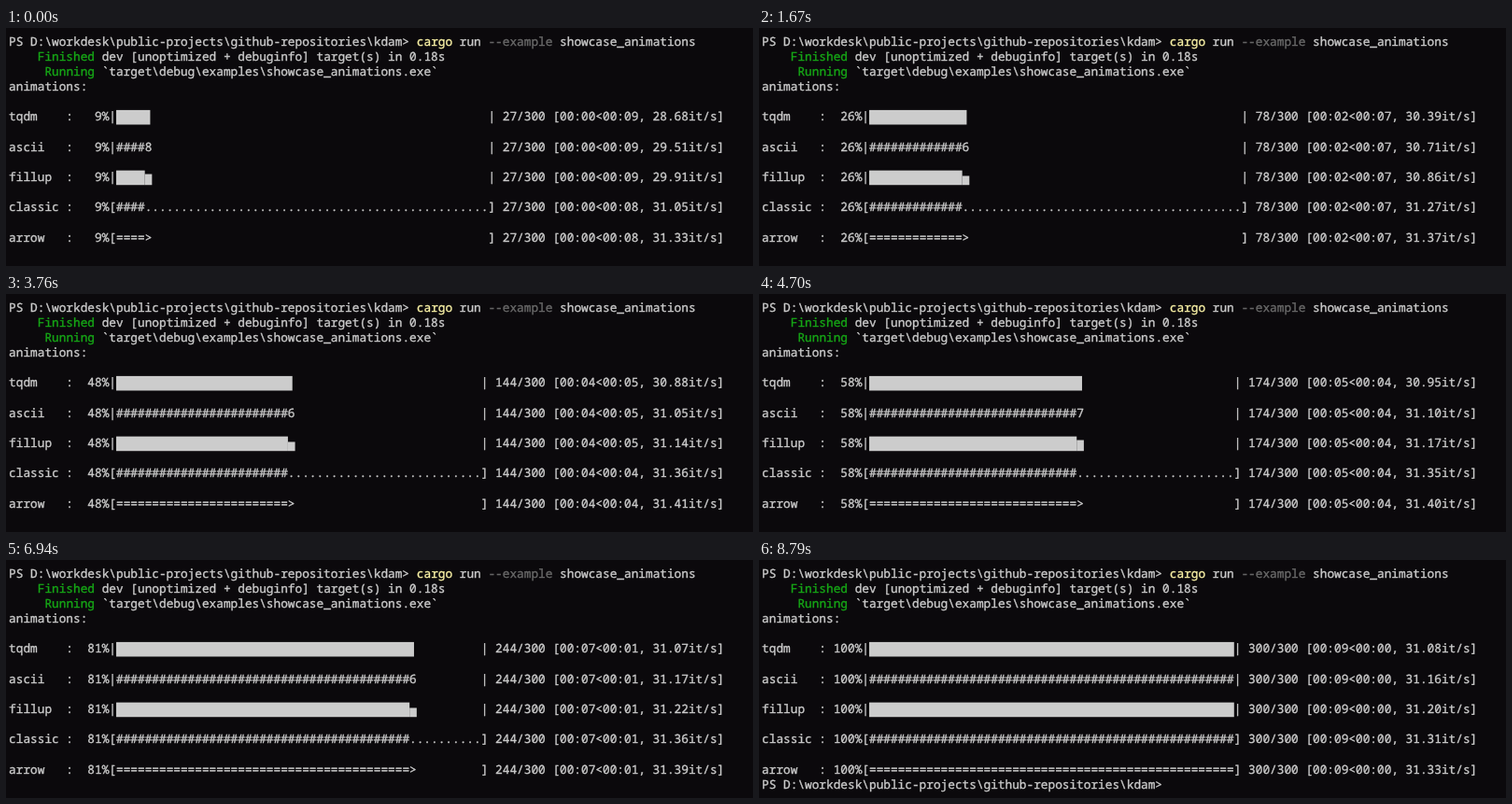
Write an HTML page that moves like this. It is 800x255 px and loops after 8.97 s.

```html
<!DOCTYPE html>
<html lang="en">
<head>
<meta charset="utf-8">
<title>Progress bar animations</title>
<style>
  html, body { margin: 0; width: 100%; height: 100%; overflow: hidden; background: #0b090c; }
  svg { display: block; width: 800px; height: 255px; }
  text {
    font: 12.77px "Noto Sans Mono", "DejaVu Sans Mono", monospace;
    color: #ccc;
    fill: currentColor;
    stroke: currentColor;
    stroke-width: 0.35px;
    white-space: pre;
    font-variant-ligatures: none;
    text-rendering: geometricPrecision;
  }
  rect { fill: #ccc; }
  .cmd { color: #f9f1a5; }
  .flag { color: #6a6a6a; }
  .ok { color: #16a716; }
</style>
</head>
<body>
<svg id="term" viewBox="0 0 800 255"></svg>
<script>
const LOOP = 8970, TOTAL = 300, COLS = 100, BAR_COL = 15, PROMPT_AT = 8790;
const CELL_W = 7.662, LINE_H = 16.18, LEFT = 3.1, BASE = 18.5;
const BLOCK_TOP = 11.5, BLOCK_H = 15.6;

// time in ms, count reached, seconds elapsed on the last bar's clock
const KNOTS = [
  [0, 27, 0.8618], [60, 28, 0.8938], [880, 54, 1.7254], [2450, 103, 3.28],
  [3760, 144, 4.584], [5640, 204, 6.4995], [6940, 244, 7.7738], [8740, 300, 9.5742]
];

// earlier bars start their clocks sooner, so each has its own lead in seconds
const BARS = [
  { name: "tqdm", row: 5, lead: 0.0796, ends: "||" },
  { name: "ascii", row: 7, lead: 0.0531, ends: "||" },
  { name: "fillup", row: 9, lead: 0.0409, ends: "||" },
  { name: "classic", row: 11, lead: 0.0078, ends: "[]" },
  { name: "arrow", row: 13, lead: 0, ends: "[]" }
];

const term = document.getElementById("term");
const colX = col => LEFT + col * CELL_W;
const rowY = row => BASE + row * LINE_H;

function setAll(el, attrs) {
  for (const key in attrs) el.setAttribute(key, attrs[key]);
}

function add(tag, attrs) {
  const el = document.createElementNS("http://www.w3.org/2000/svg", tag);
  setAll(el, attrs);
  return term.appendChild(el);
}

function write(row, col, text, cls = "") {
  const el = add("text", { x: colX(col), y: rowY(row), class: cls });
  el.textContent = text;
  return el;
}

function lerpTable(x, from, to) {
  let i = 1;
  while (i < KNOTS.length - 1 && x >= KNOTS[i][from]) i++;
  const a = KNOTS[i - 1], b = KNOTS[i];
  const k = Math.min(1, (x - a[from]) / (b[from] - a[from]));
  return a[to] + (b[to] - a[to]) * k;
}

const clock = s => "00:" + String(Math.floor(s)).padStart(2, "0");

// whole cells, and the index of the partial symbol in a set of the given size
function split(n, width, size) {
  const steps = size - 1;
  const units = Math.floor(n * width * steps / TOTAL);
  return [Math.floor(units / steps), units % steps + 1];
}

const placeBlock = (el, row, col, w, h) => setAll(el, {
  x: colX(col),
  y: rowY(row) - BLOCK_TOP + BLOCK_H * (1 - h),
  width: w * CELL_W,
  height: BLOCK_H * h
});

const draw = {
  tqdm(bar, n, width) {
    const [full, part] = split(n, width, 8);
    placeBlock(bar.solid, bar.row, BAR_COL, full < width ? full + (part + 1) / 8 : full, 1);
    return "";
  },
  ascii(bar, n, width) {
    const [full, part] = split(n, width, 10);
    return "#".repeat(full) + (full < width ? "123456789#"[part] : "");
  },
  fillup(bar, n, width) {
    const [full, part] = split(n, width, 8);
    placeBlock(bar.solid, bar.row, BAR_COL, full, 1);
    placeBlock(bar.tip, bar.row, BAR_COL + full, full < width ? 1 : 0, (part + 1) / 8);
    return "";
  },
  classic(bar, n, width) {
    const full = Math.floor(n * width / TOTAL);
    return "#".repeat(full) + ".".repeat(width - full);
  },
  arrow(bar, n, width) {
    const full = Math.floor(n * width / TOTAL);
    return "=".repeat(full) + (full < width ? ">" : "");
  }
};

function update(bar, n, base) {
  const [open, close] = bar.ends;
  const spent = base + bar.lead, rate = n / spent;
  const percent = String(Math.floor(n * 100 / TOTAL)).padStart(3);
  const stats = `${close} ${n}/${TOTAL} [${clock(spent)}<${clock((TOTAL - n) / rate)}, ${rate.toFixed(2)}it/s]`;
  const end = COLS - stats.length;
  bar.head.textContent = `${bar.name.padEnd(8)}: ${percent}%${open}`;
  bar.body.textContent = draw[bar.name](bar, n, end - BAR_COL);
  bar.tail.textContent = stats;
  bar.tail.setAttribute("x", colX(end));
}

const PROMPT = "PS D:\\workdesk\\public-projects\\github-repositories\\kdam>";
write(0, 0, PROMPT);
write(0, 57, "cargo", "cmd");
write(0, 63, "run");
write(0, 67, "--example", "flag");
write(0, 77, "showcase_animations");
write(1, 4, "Finished", "ok");
write(1, 13, "dev [unoptimized + debuginfo] target(s) in 0.18s");
write(2, 5, "Running", "ok");
write(2, 13, "`target\\debug\\examples\\showcase_animations.exe`");
write(3, 0, "animations:");
const lastPrompt = write(14, 0, PROMPT);

for (const bar of BARS) {
  bar.solid = add("rect", {});
  bar.tip = add("rect", {});
  bar.head = write(bar.row, 0, "");
  bar.body = write(bar.row, BAR_COL, "");
  bar.tail = write(bar.row, 0, "");
}

let shown = 0;
function frame() {
  const t = performance.now() % LOOP;
  const n = Math.floor(lerpTable(t, 0, 1) + 1e-6);
  if (n !== shown) {
    const base = lerpTable(n, 1, 2);
    for (const bar of BARS) update(bar, n, base);
    shown = n;
  }
  lastPrompt.setAttribute("visibility", t >= PROMPT_AT ? "visible" : "hidden");
  requestAnimationFrame(frame);
}
frame();
</script>
</body>
</html>
```
